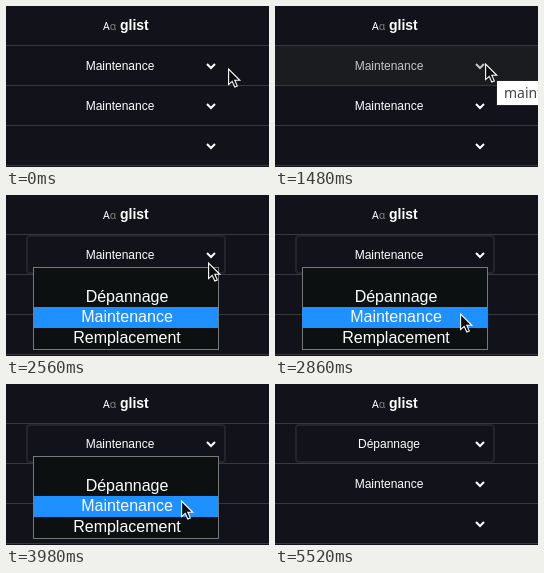
An HTML page for the animation above (5960 ms loop, 263x161 px).

```html
<!DOCTYPE html>
<html lang="fr">
<head>
<meta charset="utf-8">
<title>Liste déroulante</title>
<style>
  html, body { margin: 0; width: 100%; height: 100%; overflow: hidden; background: #11121a; }
  svg { display: block; width: 100vw; height: 100vh; font: 12px "Liberation Sans", Arial, sans-serif; fill: #fff; }
  .mid { text-anchor: middle; }
  .line { fill: #38393d; }
  .bg { fill: none; }
  .chevron { fill: none; stroke: #fff; stroke-width: 2; }
  .hover .bg { fill: #1b1c1f; }
  .hover .mid { fill: #c6c6c8; }
  .hover .chevron { stroke: #c6c6c8; }
  #popup { font-size: 16px; }
  #tip text { font: 14px "Noto Sans", "Open Sans", sans-serif; fill: #444; }
</style>
</head>
<body>
<svg viewBox="0 0 263 161">
  <text x="97" y="24" font-family="Noto Sans, sans-serif" font-weight="500" font-size="10.5">A<tspan fill="#8a7d7c">ɑ</tspan></text>
  <text x="114" y="24" font-size="14" font-weight="700">glist</text>
  <g id="rows"></g>
  <rect class="line" y="39" width="263" height="1"/>
  <rect id="focus" x="21" y="41" width="198" height="37" rx="3" fill="none" stroke="#24252a" stroke-width="2"/>
  <g id="popup">
    <rect x="27.5" y="72.5" width="185" height="82" fill="#0d1011" stroke="#77787a"/>
    <rect id="mark" x="27" width="185" height="21" fill="#1e90ff"/>
    <g class="mid">
      <text x="121" y="107">Dépannage</text>
      <text x="121" y="127">Maintenance</text>
      <text x="121" y="148">Remplacement</text>
    </g>
  </g>
  <g id="tip">
    <rect x="221.5" y="74.5" width="110" height="25" fill="#fff" stroke="#222"/>
    <text x="229" y="92">maintenance</text>
  </g>
  <path id="cursor" d="M.6 1V16.6L4.2 13.3 6.8 19 9.3 17.9 6.8 12.3H11.8Z" fill="#0c0c0e" stroke="#fff" stroke-width="1.1"/>
</svg>
<script>
const LOOP = 5960;
const OPTION_TOP = 71.5, OPTION_HEIGHT = 20.4;
const $ = id => document.getElementById(id);

// Pointer moves, each in equal jumps from the first time to the last
const start = { x: 222, y: 62 };
const moves = [
  { from: 720, to: 1020, jumps: 4, x: 210, y: 57 },
  { from: 1620, to: 1620, jumps: 1, x: 205, y: 57 },
  { from: 2540, to: 2860, jumps: 6, x: 185, y: 118 },
  { from: 2960, to: 3080, jumps: 3, x: 180, y: 137 },
  { from: 3340, to: 3480, jumps: 3, x: 176, y: 119 },
  { from: 3980, to: 4180, jumps: 4, x: 172, y: 107 },
  { from: 5200, to: 5520, jumps: 7, x: 25, y: -22 }
];

function pointer(t) {
  let { x, y } = start;
  for (const m of moves) {
    if (t < m.from) break;
    const gap = (m.to - m.from) / (m.jumps - 1) || 1;
    const p = Math.min(1, (1 + Math.floor((t - m.from) / gap)) / m.jumps);
    x += (m.x - x) * p;
    y += (m.y - y) * p;
  }
  return [Math.round(x), Math.round(y)];
}

$('rows').innerHTML = ['Maintenance', 'Maintenance', ''].map((label, i) => `
  <g transform="translate(0 ${40 + 40 * i})">
    <rect class="bg" width="263" height="39"/>
    <text class="mid" x="114" y="24">${label}</text>
    <path class="chevron" d="M201 18L205 22 209 18"/>
    <rect class="line" y="39" width="263" height="1"/>
  </g>`).join('');
const rows = [...$('rows').children];
const choice = rows[0].querySelector('text');

const show = (id, on) => $(id).style.display = on ? '' : 'none';

function draw(t) {
  const [x, y] = pointer(t);
  $('cursor').setAttribute('transform', `translate(${x} ${y})`);

  const free = (t >= 20 && t < 1760) || t >= 4540;
  const over = free ? Math.floor((y - 40) / 40) : -1;
  rows.forEach((row, i) => row.classList.toggle('hover', i === over));

  // The current choice stays marked until the pointer enters the list
  const option = y < OPTION_TOP ? 2 : Math.floor((y - OPTION_TOP) / OPTION_HEIGHT);
  $('mark').setAttribute('y', Math.round(OPTION_TOP + OPTION_HEIGHT * option));
  choice.textContent = t < 4440 ? 'Maintenance' : 'Dépannage';

  show('tip', t >= 1480 && t < 1760);
  show('focus', t >= 1760);
  show('popup', t >= 1780 && t < 4440);
}

function tick() {
  draw(performance.now() % LOOP);
  requestAnimationFrame(tick);
}
tick();
</script>
</body>
</html>
```
